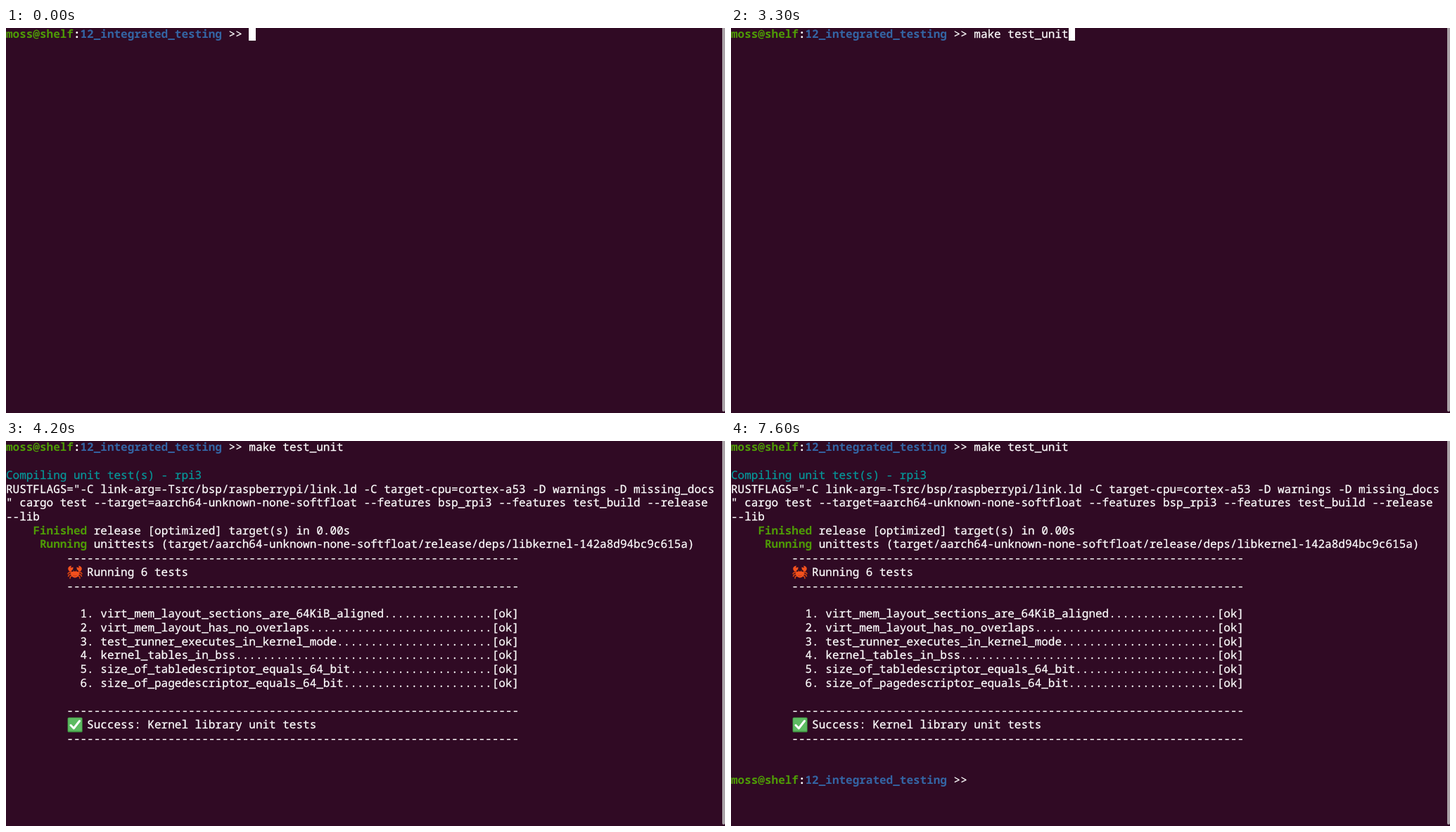
Recreate the animation shown at these times as an HTML page. Size 1022 by 548 pixels, loop 8000 ms.

```html
<!DOCTYPE html>
<html lang="en">
<head>
<meta charset="utf-8">
<title>Terminal session</title>
<style>
  html, body { margin: 0; width: 100%; height: 100%; overflow: hidden; background: #300a24; }

  .term {
    --cw: 9.592px;
    --ch: 19.73px;
    position: absolute; left: 0; top: 0;
    width: 1022px; height: 548px;
    overflow: hidden;
    background: #300a24;
    animation: session 8s step-end infinite;
  }
  pre {
    position: absolute; left: 0; top: -.7px;
    margin: 0;
    color: #fff;
    font: 16px/19.73px "Noto Sans Mono", "DejaVu Sans Mono", monospace;
    letter-spacing: -.008px;
    text-rendering: geometricPrecision;
    -webkit-text-stroke: .25px;
    white-space: pre;
  }
  b { font-weight: 700; -webkit-text-stroke: 0; }
  .user, .tag { color: #4e9a06; }
  .dir { color: #3465a4; }
  .note { color: #06989a; }

  .typed {
    display: inline-block;
    clip-path: inset(-4px calc((14 - var(--typed)) * var(--cw)) -4px 0);
  }
  .out { opacity: calc(var(--step) - var(--after)); }

  .cursor {
    position: absolute;
    left: calc((var(--home) + var(--typed)) * var(--cw));
    top: calc(var(--row) * var(--ch) - 1.6px);
    width: var(--cw); height: var(--ch);
    background: #fff;
    opacity: var(--on);
  }
  .bar {
    position: absolute; left: 1018px; top: 0;
    width: 4px; height: 546px;
    border-radius: 0 0 2px 2px;
    background: #aaa2a7;
  }
  svg { position: absolute; left: 87px; width: 22px; height: 22px; }

  /* typed: characters entered; step: output blocks shown; home/row/on: cursor */
  @keyframes session {
    0%     { --typed: 0; --step: 0; --home: 36; --row: 0; --on: 1; }
    3.75%  { --on: 0; }
    5%     { --on: 1; }
    6.25%  { --typed: 1; }
    7.5%   { --typed: 2; }
    10%    { --typed: 3; }
    11.25% { --typed: 4; }
    12.5%  { --typed: 5; }
    15%    { --typed: 6; }
    16.25% { --typed: 7; }
    18.75% { --typed: 8; }
    20%    { --typed: 9; }
    28.75% { --typed: 10; }
    32.5%  { --typed: 11; }
    35%    { --typed: 12; }
    38.75% { --typed: 13; }
    41.25% { --typed: 14; }
    42.5%  { --step: 1; --home: -14; --row: 6; }
    45%    { --step: 2; --row: 8; }
    48.75% { --on: 0; }
    52.5%  { --step: 3; }
    55%    { --step: 4; --home: 22; --row: 24; }
    56.25% { --on: 1; }
    65%    { --on: 0; }
    72.5%  { --on: 1; }
    78.75% { --on: 0; }
    86.25% { --on: 1; }
    95%    { --on: 0; }
    100%   { --typed: 14; --step: 4; --home: 22; --row: 24; --on: 0; }
  }
</style>
</head>
<body>
<div class="term">
  <div class="cursor"></div>
<pre><b class="user">moss@shelf</b><b>:</b><b class="dir">12_integrated_testing</b> &gt;&gt; <span class="typed">make test_unit</span>

<span class="out" style="--after:0"><span class="note">Compiling unit test(s) - rpi3</span>
RUSTFLAGS="-C link-arg=-Tsrc/bsp/raspberrypi/link.ld -C target-cpu=cortex-a53 -D warnings -D missing_docs
" cargo test --target=aarch64-unknown-none-softfloat --features bsp_rpi3 --features test_build --release
--lib</span>
<span class="out" style="--after:1">    <b class="tag">Finished</b> release [optimized] target(s) in 0.00s
     <b class="tag">Running</b> unittests (target/aarch64-unknown-none-softfloat/release/deps/libkernel-142a8d94bc9c615a)</span>
<span class="out" id="report" style="--after:2"></span>


<span class="out" style="--after:3"><b class="user">moss@shelf</b><b>:</b><b class="dir">12_integrated_testing</b> &gt;&gt;</span></pre>

  <svg class="out" style="--after:2; top:176px" viewBox="0 0 22 22">
    <g fill="none" stroke="#d84310" stroke-width="1.5" stroke-linecap="round" stroke-linejoin="round">
      <path d="M6 12 2.5 11 1 13M6 14 3 14 1.5 16.5M7 16 4.5 17 4 19.5M16 12 19.5 11 21 13M16 14 19 14 20.5 16.5M15 16 17.5 17 18 19.5"/>
      <path d="M6.5 11 3.5 8.5M15.5 11 18.5 8.5" stroke-width="2"/>
      <path d="M9 10V7.5M13 10V7.5" stroke-width="1.1"/>
    </g>
    <g fill="#f4511e">
      <path d="M3.500 9.500C-.5 7 1 2 6 1.500L5 4.500 8.500 3.500C9 6.500 7 9 3.500 9.500ZM18.500 9.500C22.500 7 21 2 16 1.500L17 4.500 13.500 3.500C13 6.500 15 9 18.500 9.500Z"/>
      <path d="M5 12.500C5.500 8.500 16.500 8.500 17 12.500 17 16 14 18.500 11 18.500S5 16 5 12.500Z"/>
    </g>
    <circle cx="9" cy="7.700" r="1.100" fill="#3a1a18"/>
    <circle cx="13" cy="7.700" r="1.100" fill="#3a1a18"/>
    <path d="M8.500 15.300Q11 17 13.500 15.300" fill="none" stroke="#b8320c" stroke-width=".8"/>
  </svg>

  <svg class="out" style="--after:2; top:392.500px" viewBox="0 0 22 22">
    <rect x=".6" y=".4" width="21" height="21" rx="1.500" fill="#43a047"/>
    <rect x="1.400" y="1.200" width="19.400" height="18.600" rx="1.500" fill="#5dbb62"/>
    <path d="M5 11.500 9.300 16 17.500 5.500" fill="none" stroke="#fff" stroke-width="3" stroke-linecap="round" stroke-linejoin="round"/>
  </svg>

  <div class="bar"></div>
</div>
<script>
  const tests = [
    'virt_mem_layout_sections_are_64KiB_aligned',
    'virt_mem_layout_has_no_overlaps',
    'test_runner_executes_in_kernel_mode',
    'kernel_tables_in_bss',
    'size_of_tabledescriptor_equals_64_bit',
    'size_of_pagedescriptor_equals_64_bit'
  ];
  const pad = n => ' '.repeat(n);
  const rule = pad(9) + '-'.repeat(67);
  const rows = tests.map((name, i) => `${pad(11)}${i + 1}. ${name.padEnd(58, '.')}[ok]`);

  document.getElementById('report').textContent = [
    rule, `${pad(12)}Running ${tests.length} tests`, rule, '',
    ...rows, '',
    rule, `${pad(12)}Success: Kernel library unit tests`, rule
  ].join('\n');
</script>
</body>
</html>
```
